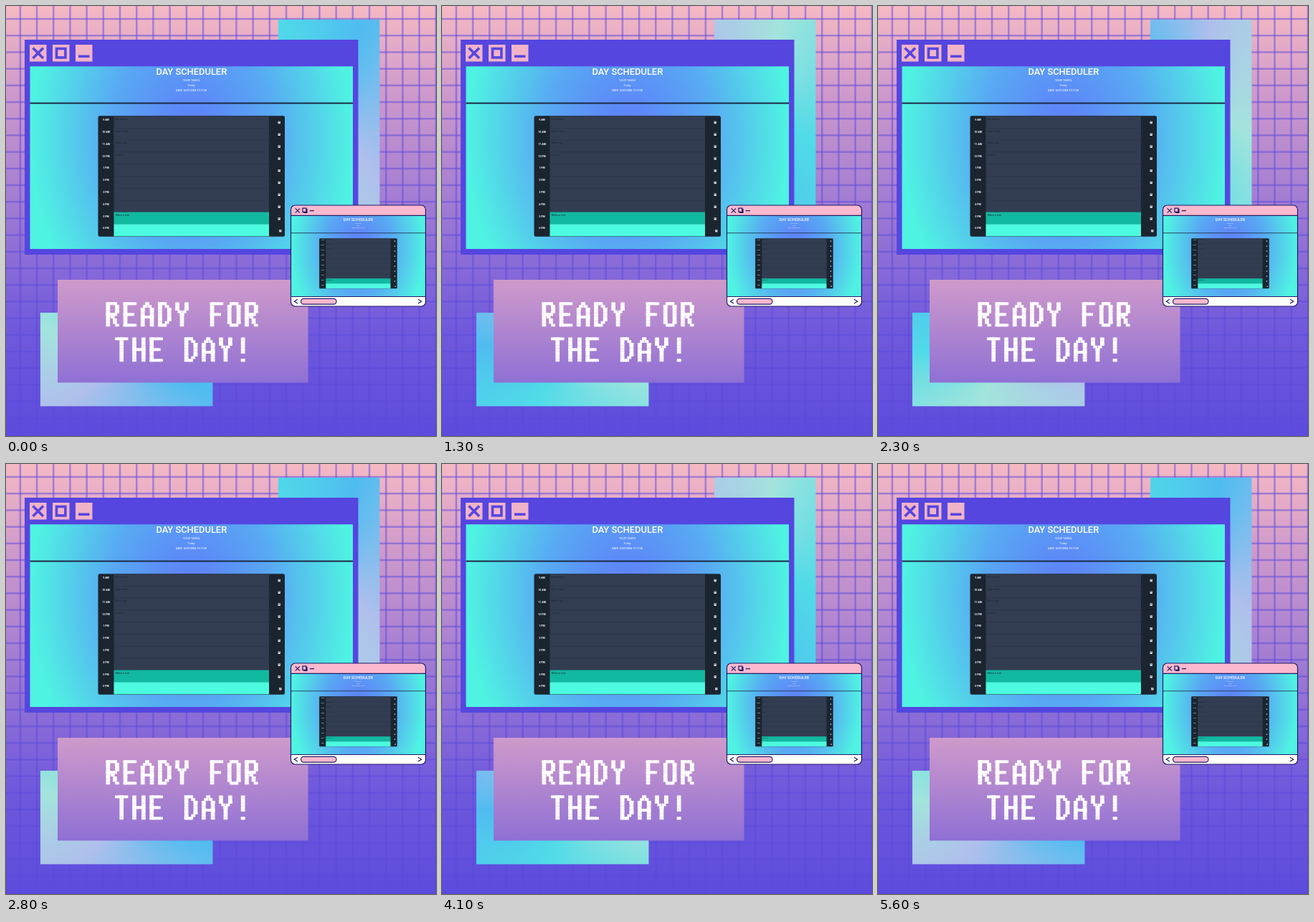
Write an HTML page with a canvas that moves like this. It is 600 px wide and 600 px high and loops after 5.7 s.

```html
<!DOCTYPE html>
<html lang="en">
<head>
<meta charset="utf-8">
<title>Day scheduler</title>
<style>
html, body { margin: 0; width: 100%; height: 100%; overflow: hidden; }
canvas { display: block; }
</style>
</head>
<body>
<canvas width="600" height="600" aria-label="READY FOR THE DAY!"></canvas>
<script>
const ctx = document.querySelector('canvas').getContext('2d');
const LOOP = 5700, STEP = 100;
const PURPLE = '#5546e0', PINK = '#f0b3c8', NAVY = '#211c66', DARK = '#1b2530';

// Pixel letters as pen strokes: pairs are column and row on a 5 x 9 grid.
const GLYPHS = {
  R: '08 00 30 41 43 34 04,14 48', E: '40 00 08 48,04 34', A: '08 02 20 42 48,05 45',
  D: '00 08 28 46 42 20 00', Y: '00 02 24 42 40,24 28', F: '40 00 08,04 34',
  O: '10 30 41 47 38 18 07 01 10', T: '00 40,20 28', H: '00 08,40 48,04 44', '!': '20 25,28 28'
};

function box(x, y, w, h, fill) {
  ctx.fillStyle = fill;
  ctx.fillRect(x, y, w, h);
}

function rounded(x, y, w, h, r, fill, stroke) {
  ctx.beginPath();
  ctx.roundRect(x, y, w, h, r);
  if (fill) { ctx.fillStyle = fill; ctx.fill(); }
  if (stroke) { ctx.strokeStyle = stroke; ctx.stroke(); }
}

// Each path is a flat list of x, y values.
function lines(color, width, ...paths) {
  ctx.strokeStyle = color;
  ctx.lineWidth = width;
  ctx.beginPath();
  for (const p of paths)
    for (let i = 0; i < p.length; i += 2) ctx[i ? 'lineTo' : 'moveTo'](p[i], p[i + 1]);
  ctx.stroke();
}

function text(str, x, y, size, color = '#fff', weight = 400, align = 'center') {
  ctx.font = `${weight} ${size}px Roboto, sans-serif`;
  ctx.textAlign = align;
  ctx.fillStyle = color;
  ctx.fillText(str, x, y);
}

function fade(gradient, stops) {
  for (const [at, color] of stops) gradient.addColorStop(at, color);
  return gradient;
}

const vertical = (y0, y1, stops) => fade(ctx.createLinearGradient(0, y0, 0, y1), stops);

function background() {
  box(0, 0, 600, 600, vertical(0, 600, [
    [0, '#f5b9c3'], [0.2, '#cf9acb'], [0.5, '#9a77d4'], [0.75, '#7059dc'], [1, '#5c4bdd']]));
  ctx.fillStyle = 'rgba(91,75,221,.5)';
  for (let i = 0; i < 26; i++) {
    ctx.fillRect(18.6 + i * 23.2, 0, 2.5, 600);
    ctx.fillRect(0, 16.8 + i * 23.2, 600, 2.5);
  }
}

// A panel with one colour per corner, turning around its centre.
function panel(cx, cy, w, h, tilt, angle) {
  ctx.save();
  ctx.translate(cx, cy);
  ctx.rotate(tilt);
  ctx.scale(w, h);
  box(-0.5, -0.5, 1, 1, fade(ctx.createConicGradient(angle, 0, 0), [
    [0, '#afbfec'], [0.25, '#a3e4dc'], [0.5, '#50dbe8'], [0.75, '#4fbcf0'], [1, '#afbfec']]));
  ctx.restore();
}

function panels(t) {
  const phase = 2 * Math.PI * (t - 300) / (LOOP / 2);
  // The turn rests briefly after every half revolution.
  const angle = 0.75 * Math.PI + phase - Math.sin(2 * phase) / 2;
  panel(450.7, 149.5, 261, 141.5, -Math.PI / 2, angle);
  panel(168.2, 493.2, 240.5, 130.5, 0, angle);
}

function scheduler() {
  ctx.save();
  ctx.translate(259, 185);
  ctx.scale(225, 300);
  box(-1.01, -0.4, 2.02, 1, fade(ctx.createRadialGradient(0, 0, 0, 0, 0, 1),
    [[0, '#5f7afa'], [0.5, '#58a8f3'], [1, '#4ff3e2']]));
  ctx.restore();
  text('DAY SCHEDULER', 258.8, 96.3, 12.9, '#fff', 500);
  text('YOUR TASKS', 258.5, 105, 4);
  text('Today', 258.5, 111.5, 3.8);
  text('DATE: 16/07/2024 17:17:38', 258.5, 118.6, 3.4, '#fff', 500);
  box(33, 134.6, 452, 2, '#1d2a45');

  ctx.save();
  ctx.beginPath();
  ctx.roundRect(128.5, 153.2, 260.5, 168.5, 2.5);
  ctx.clip();
  box(128, 153, 262, 169, DARK);
  const hours = ['9 AM', '10 AM', '11 AM', '12 PM', '1 PM', '2 PM', '3 PM', '4 PM', '5 PM', '6 PM'];
  const tasks = { 0: 'Breakfast', 1: 'Gym class', 2: 'Meetings', 3: 'Lunch', 8: 'Write a List' };
  hours.forEach((hour, i) => {
    const y = 153.2 + i * 16.8;
    box(150.5, y, 216.5, 17, i < 8 ? '#323d51' : i < 9 ? '#12b9a1' : '#4cfbe0');
    if (i && i < 8) box(150.5, y, 216.5, 0.6, '#29344a');
    text(hour, 139.5, y + 7, 3.6, '#fff', 700);
    if (tasks[i]) text(tasks[i], 152.5, y + 5.6, 4, DARK, 400, 'left');
    const x = i < 9 ? 379.6 : 381.2;
    box(x, y + 7.6, 3.2, 3.4, '#e9edf2');
    box(x + 0.8, y + 8.3, 1.6, 0.8, DARK);
  });
  ctx.restore();
}

function bigWindow() {
  box(26, 47, 465.5, 300, PURPLE);
  for (let i = 0; i < 3; i++) box(33 + i * 32, 54, 23.5, 23.5, PINK);
  lines(PURPLE, 3.6, [37.5, 58.5, 52, 73], [52, 58.5, 37.5, 73]);
  ctx.strokeRect(70.5, 59.5, 12.4, 12.4);
  box(101, 68.5, 15.5, 3.5, PURPLE);
  ctx.save();
  ctx.beginPath();
  ctx.rect(33.5, 84.3, 450.5, 254.7);
  ctx.clip();
  scheduler();
  ctx.restore();
}

function smallWindow() {
  ctx.save();
  ctx.beginPath();
  ctx.roundRect(397.5, 278, 188, 141, 6);
  ctx.clip();
  box(397, 277, 190, 16, '#fbb9cf');
  ctx.beginPath();
  ctx.rect(397, 292, 190, 113.5);
  ctx.clip();
  ctx.translate(397.5, 295.4);
  ctx.scale(0.417, 0.417);
  ctx.translate(-33.5, -84.3);
  scheduler();
  ctx.restore();

  rounded(397.5, 405.5, 188, 13.5, [0, 0, 6, 6], '#fff');
  lines(NAVY, 1.2, [397.5, 292.3, 585.5, 292.3], [397.5, 405.5, 585.5, 405.5],
    [403.7, 282.3, 410, 288.6], [410, 282.3, 403.7, 288.6], [423.7, 285.6, 430, 285.6],
    [407, 409.3, 402.3, 412.2, 407, 415.1], [575, 409.3, 579.7, 412.2, 575, 415.1]);
  rounded(397.5, 278, 188, 141, 6, null, NAVY);
  rounded(411.5, 408.3, 49.5, 7.8, 3.9, '#fbb9cf', NAVY);
  box(415, 283, 5.6, 6, NAVY);
  rounded(413.9, 282.2, 5, 5.2, 0, '#fbb9cf', NAVY);
}

function pixelText(str, x, y) {
  const cw = 3.2, ch = 3.75, advance = 24.2;
  ctx.fillStyle = '#fff';
  [...str].forEach((letter, n) => {
    for (const stroke of (GLYPHS[letter] || '').split(',')) {
      const points = stroke.split(' ').map(p => [+p[0], +p[1]]);
      for (let i = 1; i < points.length; i++) {
        const [x0, y0] = points[i - 1];
        const dx = points[i][0] - x0, dy = points[i][1] - y0;
        const count = Math.max(Math.abs(dx), Math.abs(dy)) || 1;
        for (let k = 0; k <= count; k++) {
          const col = Math.round(x0 + dx * k / count), row = Math.round(y0 + dy * k / count);
          ctx.fillRect(x + n * advance + col * cw, y + row * ch, cw * 2 - 0.7, ch);
        }
      }
    }
  });
}

function card() {
  box(72, 382, 349.5, 143.5, vertical(382, 525, [[0, '#cf9acb'], [1, '#8f70d4']]));
  pixelText('READY FOR', 139.5, 413.5);
  pixelText('THE DAY!', 152, 462.5);
}

function draw() {
  const t = Math.floor(performance.now() % LOOP / STEP) * STEP;
  background();
  panels(t);
  card();
  bigWindow();
  smallWindow();
  requestAnimationFrame(draw);
}
draw();
</script>
</body>
</html>
```
